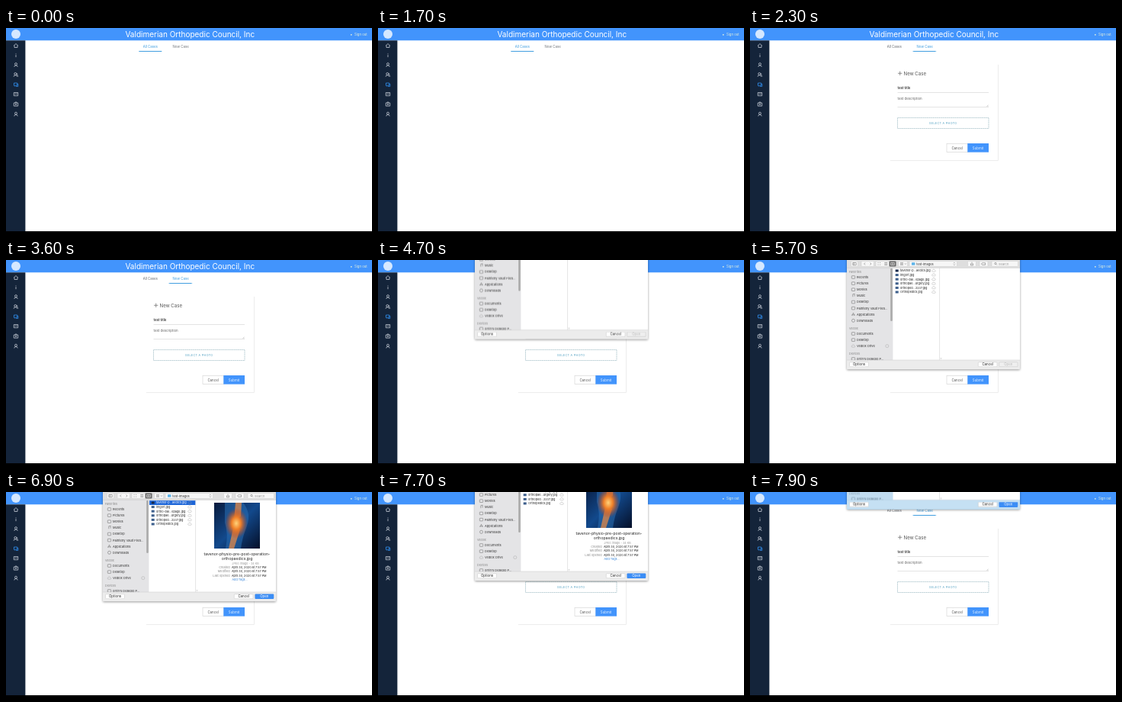
Recreate the animation shown at these times as an HTML page. Size 480 by 267 pixels, loop 8000 ms.

```html
<!DOCTYPE html>
<html lang="en">
<head>
<meta charset="utf-8">
<title>New case</title>
<style>
html, body { margin: 0; width: 100%; height: 100%; overflow: hidden; background: #fff; }
svg { display: block; width: 100vw; height: 100vh; font: 4.4px Inter, "Open Sans", sans-serif; }
.mid { text-anchor: middle; }
.end { text-anchor: end; }
.line { fill: none; stroke: currentColor; stroke-width: .8; }
.small { font-size: 4px; }
.files { font-size: 3.85px; }

/* every moving part shares one 8 s loop, stepped at 10 fps */
.ink, .tab-a, .tab-b, .form, .caret, .dialog, .loaded, .blank, .thumbs,
.picked, .name, .preview, .ready, .press, .tint { animation: 8s step-end infinite; }

.ink { animation-name: ink; }
@keyframes ink {
  0%, 21.25% { transform: none; }
  22.5% { transform: translateX(17px); }
  23.75% { transform: translateX(34px); }
  25%, 100% { transform: translateX(39.5px); }
}
.tab-a { animation-name: tab-a; }
@keyframes tab-a { 0% { fill: #429fe0; } 22.5%, 100% { fill: #686d73; } }
.tab-b { animation-name: tab-b; }
@keyframes tab-b { 0% { fill: #74797f; } 22.5%, 100% { fill: #429fe0; } }
.form { animation-name: form; }
@keyframes form { 0% { opacity: 0; } 22.5% { opacity: .3; } 23.75% { opacity: .75; } 25%, 100% { opacity: 1; } }
.caret { animation-name: caret; }
@keyframes caret { 0% { opacity: 0; } 38.75% { opacity: 1; } 45%, 100% { opacity: 0; } }

.dialog { animation-name: sheet; }
@keyframes sheet {
  0% { transform: translateY(-160px); }
  57.5% { transform: translateY(-98px); }
  58.75% { transform: translateY(-39.5px); }
  60% { transform: translateY(-8px); }
  61.25% { transform: none; }
  95% { transform: translateY(-4px); }
  96.25% { transform: translateY(-27px); }
  97.5% { transform: translateY(-73px); }
  98.75%, 100% { transform: translateY(-120.5px); }
}
.loaded { animation-name: loaded; }
@keyframes loaded { 0% { opacity: 0; } 66.25%, 100% { opacity: 1; } }
.blank { animation-name: blank; }
@keyframes blank { 0% { opacity: 1; } 70%, 100% { opacity: 0; } }
.thumbs { animation-name: thumbs; }
@keyframes thumbs { 0% { opacity: 0; } 70%, 100% { opacity: 1; } }
.picked { animation-name: picked; }
@keyframes picked { 0% { opacity: 0; } 83.75%, 100% { opacity: 1; } }
.name { animation-name: name; }
@keyframes name { 0% { fill: #222; } 83.75%, 100% { fill: #fff; } }
.preview, .ready { animation-name: preview; }
@keyframes preview { 0% { opacity: 0; } 86.25%, 100% { opacity: 1; } }
.press { animation-name: press; }
@keyframes press { 0% { opacity: 0; } 93.75% { opacity: .2; } 95%, 100% { opacity: 0; } }
.tint { animation-name: tint; }
@keyframes tint { 0% { opacity: 0; } 97.5% { opacity: .2; } 98.75%, 100% { opacity: .4; } }
</style>
</head>
<body>
<svg viewBox="0 0 480 267" preserveAspectRatio="none">
  <defs>
    <g id="user" class="line"><circle cy="-1" r="1.5"/><path d="M-2.2 2.7Q-2 .7 0 .7T2.2 2.7"/></g>
    <path id="cloud" d="M-1.6 1.3a1.1 1.1 0 0 1 0-2.1a1.6 1.6 0 0 1 3 0a1.1 1.1 0 0 1 .2 2.1z" fill="none" stroke="#999" stroke-width=".4"/>
    <rect id="doc" x="-2.2" y="-1.8" width="4.4" height="3.6" rx=".6" fill="none" stroke="#777" stroke-width=".6"/>
    <rect id="thumb" x="-2" y="-1.5" width="4" height="3"/>
    <radialGradient id="glow">
      <stop offset="0" stop-color="#ffd27a"/>
      <stop offset=".4" stop-color="#f08028"/>
      <stop offset="1" stop-color="#c03a10" stop-opacity="0"/>
    </radialGradient>
    <linearGradient id="night" x2="1" y2="1">
      <stop offset="0" stop-color="#081a3c"/>
      <stop offset=".5" stop-color="#12498c"/>
      <stop offset="1" stop-color="#050f28"/>
    </linearGradient>
    <filter id="shadow" x="-5%" y="-5%" width="110%" height="112%">
      <feDropShadow dx="0" dy="1" stdDeviation="1.6" flood-opacity=".4"/>
    </filter>
    <clipPath id="side"><path d="M127 10.5h60V131h-60z"/></clipPath>
    <clipPath id="photo"><path d="M273 14h60v60h-60z"/></clipPath>
  </defs>

  <rect width="480" height="267" fill="#fff"/>

  <!-- tabs -->
  <g class="mid">
    <text class="tab-a" x="189.3" y="26">All Cases</text>
    <text class="tab-b" x="229.2" y="26">New Case</text>
  </g>
  <rect class="ink" x="174.3" y="30" width="30" height="1" fill="#429fe0"/>

  <!-- form -->
  <g class="form">
    <path d="M184 173.5H325.5V48" fill="none" stroke="#ededed"/>
    <path d="M194 59.3h5.4M196.7 56.6v5.4" stroke="#666" stroke-width=".7"/>
    <text x="201.6" y="61.8" font-size="6.1" fill="#555">New Case</text>
    <text x="193.5" y="79.8" fill="#222" font-weight="500">test title</text>
    <rect class="caret" x="210.2" y="75" width=".7" height="6" fill="#222"/>
    <text x="193.5" y="94.4" fill="#666">test description</text>
    <path d="M193.5 84.5H313M193.5 103.5H313" stroke="#dedede" stroke-width=".8"/>
    <path d="M310.5 102.7l2-2M311.7 102.8l.9-.9" stroke="#888" stroke-width=".4"/>
    <rect x="193.5" y="117.5" width="119.5" height="14" fill="#fff" stroke="#a9c3cb" stroke-width=".8" stroke-dasharray="1.2 .4"/>
    <g class="mid">
      <text x="253.3" y="125.9" font-size="3.7" letter-spacing=".35" fill="#4f9fc0">SELECT A PHOTO</text>
      <rect x="258" y="151.3" width="28" height="11" fill="#fff" stroke="#d6d6d6" stroke-width=".7"/>
      <text x="271.6" y="158.5" fill="#555">Cancel</text>
      <rect x="285.3" y="151" width="27.7" height="11.6" fill="#4294fc"/>
      <text x="299.1" y="158.5" fill="#e4f1ff">Submit</text>
    </g>
  </g>

  <!-- app bar -->
  <rect width="480" height="16.3" fill="#4294fc"/>
  <circle cx="13" cy="8" r="6" fill="#d5e8ff"/>
  <text class="mid" x="241.3" y="11.7" font-size="10" fill="#fff">Valdimerian Orthopedic Council, Inc</text>
  <circle cx="452.8" cy="8.8" r=".9" fill="#e6f0dc"/>
  <text x="457" y="10.1" font-size="4.3" fill="#e6f0dc">Sign out</text>

  <!-- navigation -->
  <rect y="16.3" width="25.4" height="251" fill="#14243a"/>
  <g color="#c3cad3">
    <path class="line" d="M10 23.3l3-2.7 3 2.7M11 22.8v2.7h4v-2.7"/>
    <path class="line" d="M13 33.4v.9M13 35.2v3"/>
    <use href="#user" x="13" y="48.2"/>
    <use href="#user" x="12.3" y="61"/>
    <path class="line" d="M14.2 59.2q1.5 1.2 0 2.2q1.5.4 1.6 2.2"/>
    <path class="line" d="M10.3 84.5h5.4v4.2h-5.4zM11.5 87l1.2-1.2 1 1 1.2-1.2"/>
    <path class="line" d="M10.3 98h5.4v4.1h-5.4zM12 98v-.9h2v.9M13 99v2.1M12 100h2"/>
    <use href="#user" x="13" y="112.7"/>
  </g>
  <path class="line" color="#3291f0" d="M10.5 72h4.2v3.2h-2.4l-1.2 1v-1h-.6zM15 73.2h.8v3.2h-3"/>
  <rect y="266" width="480" height="1" fill="#000"/>

  <!-- file picker -->
  <g class="dialog">
    <rect x="127" y="-20" width="227" height="163" rx="1.5" fill="#ececec" filter="url(#shadow)"/>
    <rect x="127" y="-20" width="227" height="30.5" fill="#dedede"/>
    <rect x="127" y="10.5" width="60.5" height="120.5" fill="#e4e4e6"/>
    <rect x="187.5" y="10.5" width="166.5" height="120.5" fill="#fff"/>
    <path d="M127 10.5h227M127 131h227M248.6 10.5V131" stroke="#d0d0d0" stroke-width=".6"/>
    <path d="M249.5 128.5h2M250 129.7h1" stroke="#aaa" stroke-width=".4"/>
    <rect x="184.2" y="11" width="2.6" height="69" rx="1.3" fill="#aaa"/>

    <!-- toolbar -->
    <g fill="#f6f6f6" stroke="#c6c6c6" stroke-width=".4">
      <rect x="132.5" y="1.5" width="9" height="7" rx="1"/>
      <rect x="146" y="1.5" width="16.5" height="7" rx="1"/>
      <rect x="165" y="1.5" width="26.5" height="7" rx="1"/>
      <rect x="194.5" y="1.5" width="12" height="7" rx="1"/>
      <rect x="209" y="1.5" width="62.5" height="7" rx="1"/>
      <rect x="285.5" y="1.5" width="11" height="7" rx="1"/>
      <rect x="301" y="1.5" width="11" height="7" rx="1"/>
      <rect x="317" y="1.5" width="34.5" height="7" rx="1"/>
    </g>
    <rect x="182.5" y="1.5" width="9" height="7" rx="1" fill="#686868"/>
    <g fill="none" stroke="#777" stroke-width=".6">
      <path d="M134.8 3.5h4.4v3.2h-4.4zM136.3 3.5v3.2M151 3.5l-1.4 1.5 1.4 1.5M157.5 3.5l1.4 1.5-1.4 1.5"/>
      <path d="M167.5 3.5h1.2M170 3.5h1.2M167.5 6.2h1.2M170 6.2h1.2M176.3 3.5h4M176.3 5h4M176.3 6.5h4"/>
      <path d="M197 3.7h4M197 5h4M197 6.3h4M203 4.5l.9 1 .9-1M267 4.3l.9-1 .9 1M267 5.7l.9 1 .9-1"/>
      <path d="M289.5 4.5v2.5h3V4.5M291 6V2.7M304.5 3.8h4v2.6h-4l-1-1.3z"/>
      <circle cx="322" cy="4.6" r="1.2"/><path d="M323 5.6l1 1"/>
    </g>
    <path d="M184.5 3.5h5v3.2h-5zM186.2 3.5v3.2M187.8 3.5v3.2" fill="none" stroke="#fff" stroke-width=".5"/>
    <text class="small" x="326" y="6.5" fill="#999">Search</text>
    <g class="loaded">
      <rect x="212" y="3.3" width="4.4" height="3.4" rx=".5" fill="#5cb4ea"/>
      <text class="small" x="218.3" y="6.5" fill="#333">test-images</text>
    </g>

    <!-- places -->
    <g clip-path="url(#side)" class="small" fill="#333">
      <g fill="#858585" font-size="3.7">
        <text x="130" y="16.8">Favorites</text>
        <text x="130" y="90.8">Velbox</text>
        <text x="130" y="123.8">Devices</text>
      </g>
      <text>
        <tspan x="140" y="23.9">Recents</tspan>
        <tspan x="140" y="32">Pictures</tspan>
        <tspan x="140" y="40.1">Movies</tspan>
        <tspan x="140" y="48.2">Music</tspan>
        <tspan x="140" y="56.4">Desktop</tspan>
        <tspan x="140" y="64.5">Painterly Vault Files…</tspan>
        <tspan x="140" y="72.6">Applications</tspan>
        <tspan x="140" y="80.7">Downloads</tspan>
        <tspan x="140" y="97.9">Documents</tspan>
        <tspan x="140" y="106">Desktop</tspan>
        <tspan x="140" y="114.1">Velbox Drive</tspan>
        <tspan x="140" y="130.9">orrin's Deskolo P…</tspan>
      </text>
      <use href="#doc" x="135.5" y="22.5"/><use href="#doc" x="135.5" y="30.6"/>
      <use href="#doc" x="135.5" y="38.7"/>
      <path d="M134.8 48.2v-3.4l2.4-.6v3.4" fill="none" stroke="#777" stroke-width=".6"/>
      <use href="#doc" x="135.5" y="55"/><use href="#doc" x="135.5" y="63.1"/>
      <path d="M133.7 73l1.8-3.8 1.8 3.8M133.5 71.8h4" fill="none" stroke="#777" stroke-width=".6"/>
      <circle cx="135.5" cy="79.3" r="2" fill="none" stroke="#777" stroke-width=".6"/>
      <use href="#doc" x="135.5" y="96.5"/><use href="#doc" x="135.5" y="104.6"/>
      <use href="#cloud" x="135.5" y="112.8"/><use href="#doc" x="135.5" y="129.5"/>
      <circle class="loaded" cx="179.8" cy="112.6" r="2" fill="none" stroke="#aaa" stroke-width=".5"/>
    </g>

    <!-- files -->
    <g class="loaded files" fill="#222">
      <rect class="picked" x="188" y="11.2" width="60.3" height="5.8" fill="#1c65d8"/>
      <text class="name" x="197" y="15.4">tavenor-p…aedics.jpg</text>
      <text>
        <tspan x="197" y="21">imgort.jpg</tspan>
        <tspan x="197" y="26.6">ortho-bal…epage.jpg</tspan>
        <tspan x="197" y="32.2">orthopae…urgery.jpg</tspan>
        <tspan x="197" y="37.8">orthoped…2237.jpg</tspan>
        <tspan x="197" y="43.4">Orthopedics.jpg</tspan>
      </text>
      <g class="blank" fill="#d8d8d8">
        <use href="#thumb" x="192.7" y="14"/><use href="#thumb" x="192.7" y="19.6"/>
        <use href="#thumb" x="192.7" y="25.2"/><use href="#thumb" x="192.7" y="30.8"/>
        <use href="#thumb" x="192.7" y="36.4"/><use href="#thumb" x="192.7" y="42"/>
      </g>
      <g class="thumbs" fill="#3d5f8c">
        <use href="#thumb" x="192.7" y="14" fill="#17294a"/><use href="#thumb" x="192.7" y="19.6"/>
        <use href="#thumb" x="192.7" y="25.2"/><use href="#thumb" x="192.7" y="30.8"/>
        <use href="#thumb" x="192.7" y="36.4"/><use href="#thumb" x="192.7" y="42"/>
      </g>
      <use href="#cloud" x="241" y="14"/><use href="#cloud" x="241" y="19.6"/>
      <use href="#cloud" x="241" y="25.2"/><use href="#cloud" x="241" y="30.8"/>
      <use href="#cloud" x="241" y="36.4"/><use href="#cloud" x="241" y="42"/>
    </g>

    <!-- preview -->
    <g class="preview">
      <g clip-path="url(#photo)">
        <rect x="273" y="14" width="60" height="60" fill="url(#night)"/>
        <path d="M287 14h24q11 14 5 30q-6 15-8 30h-20q4-20-1-34z" fill="#2a6fb5" opacity=".55"/>
        <path d="M301 14h8l-1 18-9 5zM298 47l9 2-8 25h-7z" fill="#e0894a" opacity=".75"/>
        <ellipse cx="302" cy="41" rx="15" ry="20" fill="url(#glow)"/>
      </g>
      <g class="mid" font-size="5.1" fill="#222">
        <text x="303" y="82.8">tavenor-physio-pre-post-operation-</text>
        <text x="303" y="89">orthopaedics.jpg</text>
        <text x="314" y="94.6" font-size="3.7" fill="#999">JPEG image - 24 KB</text>
      </g>
      <g font-size="3.8">
        <g class="end" fill="#8a8a8a">
          <text x="293.5" y="99.8">Created</text>
          <text x="293.5" y="105.2">Modified</text>
          <text x="293.5" y="110.6">Last opened</text>
        </g>
        <text fill="#222">
          <tspan x="296" y="99.8">April 30, 2020 at 7:57 PM</tspan>
          <tspan x="296" y="105.2">April 30, 2020 at 7:57 PM</tspan>
          <tspan x="296" y="110.6">April 30, 2020 at 7:57 PM</tspan>
        </text>
        <text x="296.5" y="116.2" fill="#3a86d8">Add Tags…</text>
      </g>
    </g>

    <path class="tint" d="M127-20h60.5V131H354v12H127z" fill="#8cd0ff"/>

    <!-- footer -->
    <g class="mid">
      <g fill="#fff" stroke="#c4c4c4" stroke-width=".5">
        <rect x="130.5" y="133.7" width="25" height="6" rx="1"/>
        <rect x="299.3" y="133.7" width="24.7" height="6" rx="1"/>
        <rect x="326.7" y="133.7" width="24.3" height="6" rx="1" fill="#efefef"/>
      </g>
      <text x="143" y="138.2" fill="#222">Options</text>
      <text x="311.6" y="138.2" fill="#222">Cancel</text>
      <text x="338.8" y="138.2" fill="#bbb">Open</text>
      <g class="ready">
        <rect x="326.5" y="133.5" width="24.7" height="6.4" rx="1" fill="#3b8df5"/>
        <text x="338.8" y="138.2" fill="#fff">Open</text>
      </g>
      <rect class="press" x="326.5" y="133.5" width="24.7" height="6.4" rx="1"/>
    </g>
  </g>
</svg>
</body>
</html>
```
